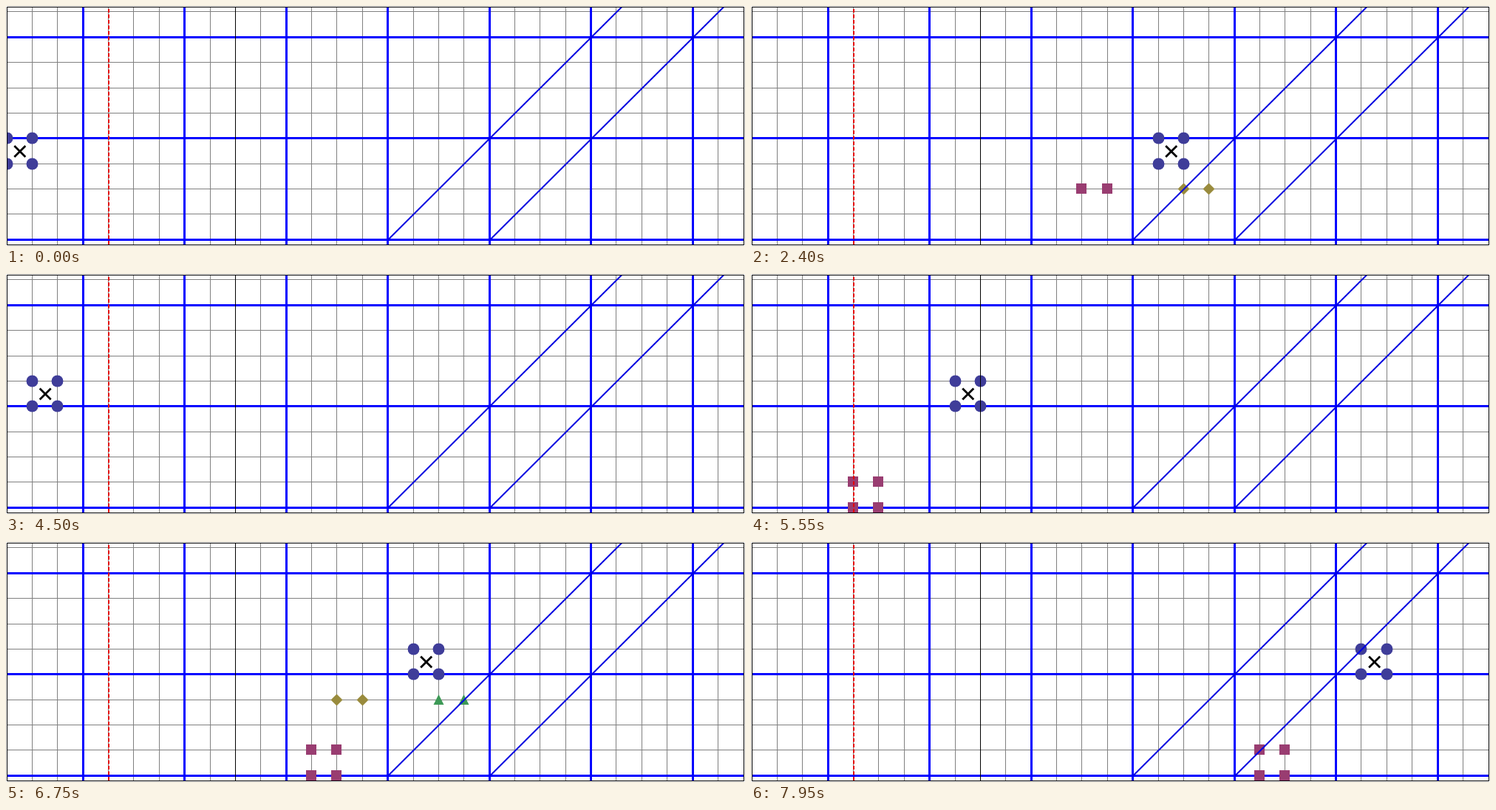
Recreate the animation shown at these times as an HTML page with a canvas. Size 1000x326 px, loop 8 s.

```html
<!DOCTYPE html>
<html lang="en">
<head>
<meta charset="utf-8">
<title>Lattice scan</title>
<style>
  html, body { margin: 0; width: 100%; height: 100%; overflow: hidden; background: #fff; }
  canvas { display: block; width: 1000px; height: 326px; }
</style>
</head>
<body>
<canvas id="stage" width="1000" height="326"></canvas>
<script>
const ctx = document.getElementById('stage').getContext('2d');
const LOOP = 8000, STEP = 150, COLS = 29, PITCH = 34.37;
const COLORS = ['#3f3d99', '#993d71', '#998b3d', '#3d9956'];

// Pixel position of lattice column i and lattice line j.
const px = i => Math.floor(1.1 + PITCH * i);
const py = j => Math.floor(179.75 + PITCH * j);

function polygon(points) {
  ctx.beginPath();
  points.forEach(([x, y]) => ctx.lineTo(x, y));
  ctx.closePath();
  ctx.fill();
}

const MARKERS = [
  (x, y) => {
    ctx.beginPath();
    ctx.arc(x + .5, y + .5, 8, 0, 2 * Math.PI);
    ctx.fill();
  },
  (x, y) => ctx.fillRect(x - 7, y - 7, 14, 14),
  (x, y) => polygon([[x + .5, y - 7.5], [x + 8.5, y + .5], [x + .5, y + 8.5], [x - 7.5, y + .5]]),
  (x, y) => polygon([[x + .5, y - 7], [x + 7.5, y + 7], [x - 6.5, y + 7]])
];

function line(x1, y1, x2, y2, color, width, dash = []) {
  ctx.strokeStyle = color;
  ctx.lineWidth = width;
  ctx.setLineDash(dash);
  ctx.beginPath();
  ctx.moveTo(x1, y1);
  ctx.lineTo(x2, y2);
  ctx.stroke();
}

const column = (i, color, width) => line(px(i) + .5, 0, px(i) + .5, 326, color, width);
const row = (j, color, width) => line(0, py(j) + .5, 1000, py(j) + .5, color, width);

function drawGrid() {
  for (let i = 1; i < COLS; i++) column(i, '#808080', 1);
  for (let j = -5; j <= 4; j++) row(j, '#808080', 1);
  for (let i = 3; i < COLS; i += 4) column(i, '#00f', 3);
  for (let j = -4; j <= 4; j += 4) row(j, '#00f', 3);
}

function drawOverlay() {
  column(9, '#000', 1);
  for (const i of [15, 19]) {
    const x = px(i) + 1, y = py(4) + .5;
    line(x, y, x + y, 0, '#0000e0', 2);
  }
  line(px(4) + 1, 324, px(4) + 1, 1, '#e60000', 2, [5, 2.5]);
}

// Lattice blocks [left column, lines] for the scanned cell and its images.
function blocks(col, level) {
  const list = [[col, [-level, 1 - level]]];
  if (level > 0) list.push([col - 4, [4 - level, 5 - level]]);
  if (col >= 15 && col < 23) {
    const wall = col < 19 ? 15 : 19;
    const lines = [1 - level + col - wall];
    const left = 14 + wall - col;
    list.push([left, lines]);
    if (wall === 15) list.push([left + 4, lines]);
  }
  return list;
}

function draw(step) {
  const col = step % COLS, level = Math.floor(step / COLS);
  ctx.fillStyle = '#fff';
  ctx.fillRect(0, 0, 1000, 326);
  ctx.save();
  ctx.beginPath();
  ctx.rect(1, 1, 998, 324);
  ctx.clip();
  drawGrid();
  blocks(col, level).forEach(([left, lines], k) => {
    ctx.fillStyle = COLORS[k];
    for (const j of lines)
      for (const i of [left, left + 1]) MARKERS[k](px(i), py(j));
  });
  drawOverlay();
  const x = 1.6 + PITCH * (col + .5), y = 180.25 + PITCH * (.5 - level), r = 7.5;
  line(x - r, y - r, x + r, y + r, '#000', 2.8);
  line(x - r, y + r, x + r, y - r, '#000', 2.8);
  ctx.restore();
  ctx.setLineDash([]);
  ctx.strokeStyle = '#000';
  ctx.lineWidth = 1;
  ctx.strokeRect(1.5, 1.5, 997, 323);
}

const start = performance.now();
let shown = -1;
function tick() {
  const step = Math.floor((performance.now() - start) % LOOP / STEP);
  if (step !== shown) draw(shown = step);
  requestAnimationFrame(tick);
}
tick();
</script>
</body>
</html>
```
